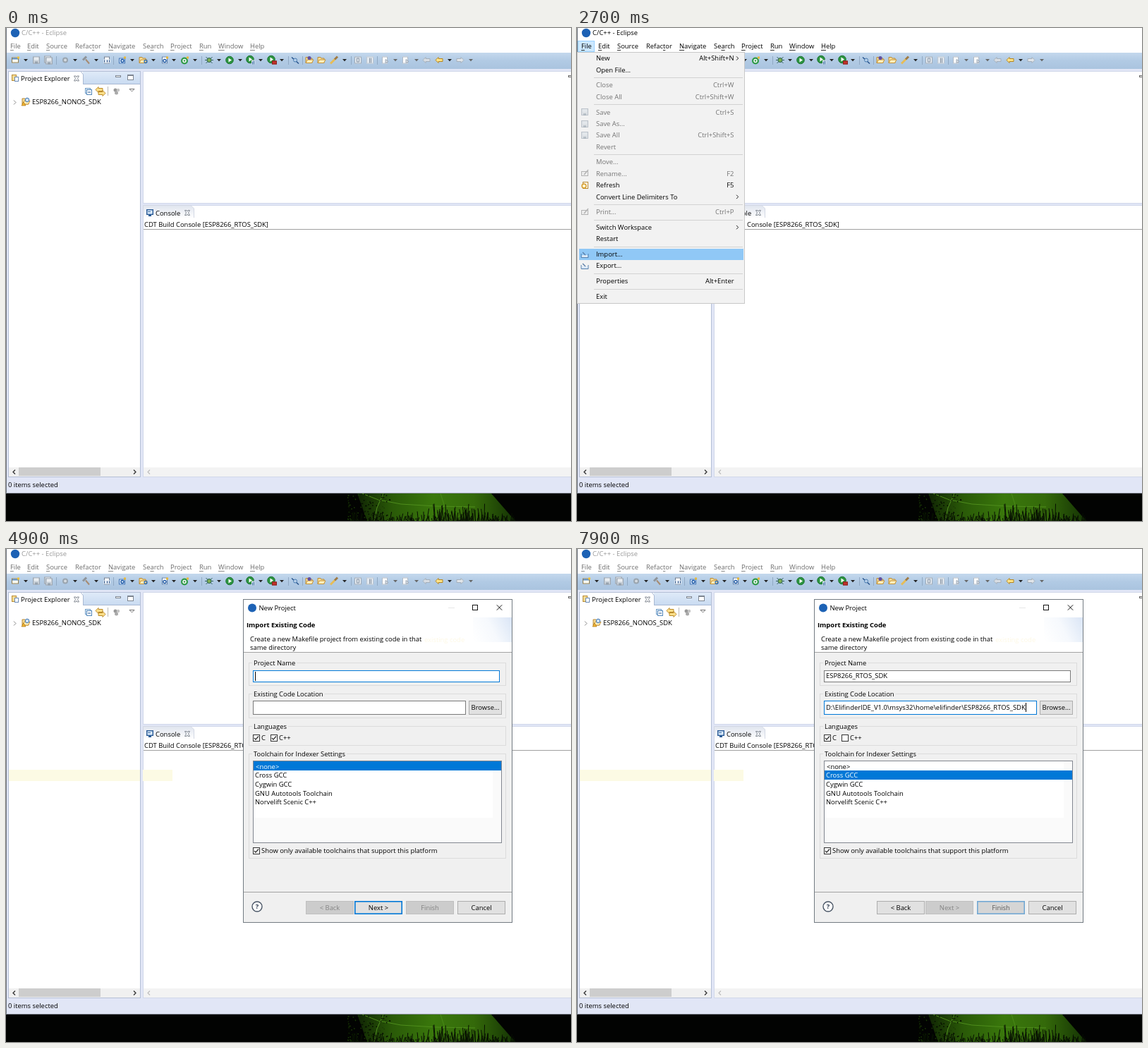
Animation of 801 by 699 pixels, one loop 8000 ms. Source, as an HTML page with a canvas:

```html
<!DOCTYPE html>
<html lang="en">
<head>
<meta charset="utf-8">
<title>Import project</title>
<style>
html, body { margin: 0; width: 100%; height: 100%; overflow: hidden; background: #000; }
canvas { display: block; width: 801px; height: 699px; }
</style>
</head>
<body>
<canvas id="stage" width="801" height="699"></canvas>
<script>
const ctx = document.getElementById('stage').getContext('2d');
const LOOP = 8000, BLUE = '#0078d7', LOGO = '#1d62b5', FACE = '#f0f0f0';
const FONT = '9.42px "Open Sans", "Noto Sans", sans-serif';
const LOCATION = 'D:\\ElifinderIDE_V1.0\\msys32\\home\\elifinder\\ESP8266_RTOS_SDK';

// Drawing helpers
function rect(x, y, w, h, fill) {
  ctx.fillStyle = fill;
  ctx.fillRect(x, y, w, h);
}
function box(x, y, w, h, fill, line, lw = 1) {
  if (fill) rect(x, y, w, h, fill);
  ctx.strokeStyle = line;
  ctx.lineWidth = lw;
  ctx.strokeRect(x + lw / 2, y + lw / 2, w - lw, h - lw);
}
function path(pts, line, lw = 1, fill) {
  ctx.beginPath();
  for (let i = 0; i < pts.length; i += 2) ctx.lineTo(pts[i], pts[i + 1]);
  if (fill) { ctx.closePath(); ctx.fillStyle = fill; ctx.fill(); }
  if (line) { ctx.strokeStyle = line; ctx.lineWidth = lw; ctx.stroke(); }
}
function disc(x, y, r, fill, line, lw = 1) {
  ctx.beginPath();
  ctx.arc(x, y, r, 0, 7);
  if (fill) { ctx.fillStyle = fill; ctx.fill(); }
  if (line) { ctx.strokeStyle = line; ctx.lineWidth = lw; ctx.stroke(); }
}
// y is the vertical middle of the capitals
function text(s, x, y, color = '#000', align = 'left', weight = '') {
  ctx.font = `${weight} ${FONT}`;
  ctx.textAlign = align;
  ctx.fillStyle = color;
  ctx.fillText(s, x, Math.round(y + 3.4));
}
function widthOf(s) {
  ctx.font = FONT;
  return ctx.measureText(s).width;
}
function shade(x0, y0, x1, y1, ...colors) {
  const g = ctx.createLinearGradient(x0, y0, x1, y1);
  colors.forEach((c, i) => g.addColorStop(i / (colors.length - 1), c));
  return g;
}
function faded(alpha, draw) {
  ctx.save();
  ctx.globalAlpha *= alpha;
  draw();
  ctx.restore();
}
const clamp = k => Math.max(0, Math.min(1, k));
const down = (x, y, color = '#222') => path([x - 3, y - 1.5, x + 3, y - 1.5, x, y + 1.8], null, 1, color);
const cross = (x, y, r, color, lw = 1) => {
  path([x - r, y - r, x + r, y + r], color, lw);
  path([x - r, y + r, x + r, y - r], color, lw);
};
const folder = (x, y) => {
  path([x - 5, y + 4, x - 5, y - 4, x - 1, y - 4, x, y - 2.5, x + 4, y - 2.5, x + 4, y + 4], '#b98a35', 1, '#f7dc96');
  path([x - 5, y + 4, x - 2.5, y - .5, x + 6, y - .5, x + 3.5, y + 4], '#c79436', 1, '#fff0bd');
};
const floppy = (x, y) => {
  box(x - 5, y - 5, 10, 10, '#c9d1d9', '#9ca6b1');
  rect(x - 3, y - 4, 6, 4, '#e9edf1');
  rect(x - 2, y + 2, 4, 3, '#98a3ae');
};
const page = (x, y, line = '#8b99aa') => box(x - 4, y - 5, 8, 10, '#fff', line);
const codeFile = (x, y) => {
  box(x - 5, y - 4.5, 11, 9, '#fff', '#4a78ad');
  rect(x - 5, y - 4.5, 11, 2, '#6d9bd0');
  rect(x - 3, y, 3, 2, '#396ca8');
  rect(x + 1, y, 3, 1, '#396ca8');
};

// Toolbar icons
const icons = {
  fresh(x, y) { box(x - 5, y - 4, 10, 8, '#fffdf0', '#8a7a50'); rect(x - 4, y - 3, 8, 2, '#5b8ec6'); rect(x + 3, y - 5, 3, 3, '#edc13c'); },
  save: floppy,
  saveAll(x, y) { floppy(x - 1, y - 1); floppy(x + 1, y + 1); },
  gear(x, y) { disc(x, y, 3, '#d5dbe1', '#9aa5af', 2); },
  hammer(x, y) { path([x - 1, y - 1, x + 4, y + 5], '#a88c72', 2); path([x - 5, y, x, y - 5], '#8f9499', 3); },
  binary(x, y) { page(x, y, '#6b7b90'); rect(x - 5, y - 1, 10, 5, '#e3ebf5'); [-4, 0, 3].forEach(d => rect(x + d, y, 1, 3, '#234a80')); },
  cproj(x, y) { box(x - 5, y - 3, 9, 8, '#dbe9fa', '#3f73b5'); disc(x, y + 1, 2, null, '#1f5aa6', 1.4); rect(x + 2, y - 5, 3, 3, '#e8b93a'); },
  src(x, y) { folder(x - 1, y); disc(x + 3, y + 2, 2, null, '#2e6cb0', 1.3); },
  cfile(x, y) { page(x, y, '#5b7fab'); disc(x, y + 1, 2, null, '#1f5aa6', 1.4); rect(x + 2, y - 5, 3, 3, '#e8b93a'); },
  klass(x, y) { disc(x - 1, y + 1, 5, '#2f9a48'); disc(x - 1, y + 1, 2, null, '#fff', 1.4); rect(x + 2, y - 5, 3, 3, '#e8b93a'); },
  bug(x, y) { cross(x, y, 4.5, '#33635f'); path([x - 6, y, x + 6, y], '#33635f'); disc(x, y, 3, '#7fae54', '#28614f'); },
  run(x, y) { disc(x, y, 5.3, '#2c9440', '#1d7432'); path([x - 1.5, y - 3, x + 3, y, x - 1.5, y + 3], null, 1, '#fff'); },
  profile(x, y) { icons.run(x - 1, y - 1); rect(x + 1, y, 5, 6, '#dbe3ec'); rect(x + 2, y + 2, 1, 4, '#2c66a2'); rect(x + 4, y + 1, 1, 5, '#2c66a2'); },
  tools(x, y) { icons.run(x - 1, y - 1); box(x, y + 1, 7, 5, '#c6322b', '#86211c'); },
  skip(x, y) { path([x - 5, y - 4, x + 5, y + 5], '#26528c', 1.5); disc(x, y, 2.5, '#b7cfe9', '#467aaf'); },
  ball(x, y) { folder(x, y); disc(x, y - 3, 2.6, '#6250a0'); },
  folder,
  pen(x, y) { path([x - 5, y + 5, x + 1, y - 1], '#e6bd58', 3); path([x + 1, y - 1, x + 5, y - 5], '#a07b45', 3); },
  block(x, y) { box(x - 5, y - 5, 10, 10, '#e4eaf1', '#9fabb8'); box(x - 2, y - 3, 4, 6, null, '#8592a1'); },
  mark(x, y) { box(x - 5, y - 5, 10, 10, '#e4eaf1', '#c0c9d3'); rect(x - 1, y - 3, 1, 7, '#7f8c9b'); rect(x + 1, y - 3, 1, 7, '#7f8c9b'); },
  step(x, y) { page(x - 1, y, '#b0bac6'); path([x, y - 1, x + 4, y + 2, x, y + 4], '#9aa6b3', 1, '#dfe5ec'); },
  last(x, y) { arrow(x, y, -1, '#d9dee4', '#a4afba'); },
  back(x, y) { arrow(x, y, -1, '#ffe48a', '#b5851d'); },
  next(x, y) { arrow(x, y, 1, '#e2e6ea', '#a4afba'); }
};
function arrow(x, y, d, fill, line) {
  path([x + d * 5, y, x + d, y - 4, x + d, y - 2, x - d * 5, y - 2, x - d * 5, y + 2, x + d, y + 2, x + d, y + 4, x + d * 5, y], line, 1, fill);
}
const tools = [[13, 'fresh'], [43, 'save'], [60, 'saveAll'], [84, 'gear'], [114, 'hammer'], [143, 'binary'], [165, 'cproj'],
  [195, 'src'], [225, 'cfile'], [254, 'klass'], [288, 'bug'], [317, 'run'], [347, 'profile'], [377, 'tools'], [410, 'skip'],
  [430, 'ball'], [447, 'folder'], [465, 'pen'], [499, 'block'], [516, 'mark'], [538, 'step'], [567, 'step'], [596, 'last'],
  [614, 'back'], [644, 'next']];
const drops = [28, 98, 128, 179, 209, 238, 268, 302, 332, 361, 391, 480, 552, 582, 629, 659];

// Label, left edge, index of the underlined letter
const menuBar = [['File', 6, 0], ['Edit', 30, 0], ['Source', 57, 0], ['Refactor', 98, 5], ['Navigate', 145, 0],
  ['Search', 194, 2], ['Project', 233, 0], ['Run', 274, 0], ['Window', 301, 0], ['Help', 346, 0]];

// "-" is a separator, "~" marks a disabled entry, ">" a submenu
const fileMenu = ['New|Alt+Shift+N|>', 'Open File...', '-', '~Close|Ctrl+W', '~Close All|Ctrl+Shift+W', '-', '~Save|Ctrl+S',
  '~Save As...', '~Save All|Ctrl+Shift+S', '~Revert', '-', '~Move...', '~Rename...|F2', 'Refresh|F5',
  'Convert Line Delimiters To||>', '-', '~Print...|Ctrl+P', '-', 'Switch Workspace||>', 'Restart', '-', 'Import...',
  'Export...', '-', 'Properties|Alt+Enter', '-', 'Exit'];

function desktop() {
  rect(0, 660, 801, 39, '#020302');
  path([498, 660, 688, 660, 722, 699, 512, 699], null, 1, shade(490, 0, 722, 0, '#0c1c03', '#2a5a08', '#3a780c', '#34690a', '#143204'));
  path([505, 660, 528, 669, 560, 675, 610, 678, 665, 679], '#4f8d1c', 1);
  path([535, 660, 526, 680, 522, 699], '#528f20', 1);
  path([616, 660, 622, 679], '#4a8a18', 1);
  let seed = 7;
  const rnd = () => (seed = seed * 16807 % 2147483647) / 2147483647;
  for (let i = 0; i < 420; i++) {
    const x = 488 + rnd() * 235, h = rnd();
    if (i < 160) rect(484 + h * h * 60, 660 + rnd() * 39, 1.5, 1.5, i % 3 ? '#050a02' : '#1c3d06');
    else {
      const tall = x > 595 && x < 680 ? 24 : 13;
      path([x, 699, x + rnd() * 6 - 3, 698 - h * h * tall], '#071002', 1);
    }
  }
}

function tabClose(x, y) {
  path([x - 3.5, y - 3.5, x - 1, y - 3.5, x, y - 2, x + 1, y - 3.5, x + 3.5, y - 3.5, x + 1.5, y, x + 3.5, y + 3.5,
    x + 1, y + 3.5, x, y + 2, x - 1, y + 3.5, x - 3.5, y + 3.5, x - 1.5, y, x - 3.5, y - 3.5], '#7b828c', .9);
}

function workbench(active) {
  rect(0, 0, 801, 660, '#e1e6f6');
  rect(0, 0, 801, 35, '#fff');
  disc(13, 7, 6.2, LOGO);
  text('C/C++ - Eclipse', 22, 7, active ? '#000' : '#999');
  if (active) box(1, 18, 24, 16, '#cce8ff', '#99d1ff');
  const ink = active ? '#000' : '#6d6d6d';
  for (const [s, x, u] of menuBar) {
    text(s, x, 26, ink);
    const start = widthOf(s.slice(0, u));
    rect(x + start, 31, widthOf(s[u]), .8, ink);
  }
  rect(0, 35, 801, 23, shade(0, 35, 0, 58, '#c4d8ed', '#b1cae4', '#aac4df'));
  for (const [x, name] of tools) icons[name](x, 45.5);
  for (const x of drops) down(x, 45.5, x > 540 && x < 600 || x > 650 ? '#666' : '#222');
  [71, 152, 277, 400, 420, 489, 526].forEach(x => rect(x, 40, 1, 12, '#91a9c3'));

  // Project Explorer
  box(3, 61, 188, 576, '#fff', '#b4bfd6');
  rect(109, 62, 81, 17, shade(0, 62, 0, 79, '#dfeaf8', '#c9dbf1'));
  path([109.5, 79, 109.5, 66, 106, 61.5], '#a9b9d3');
  path([109, 79.5, 190, 79.5], '#a9b9d3');
  box(8, 66, 7, 9, '#f8db92', '#b78d38');
  box(12, 69, 6, 7, '#fff', '#6c8db8');
  text('Project Explorer', 21, 71.5);
  tabClose(100, 71.5);
  box(155, 67, 8, 3, '#fff', '#7d8590');
  box(172, 66, 9, 8, '#fff', '#7d8590');
  rect(172, 66, 9, 2, '#7d8590');
  box(112, 85, 8, 8, '#eaf3fc', '#6c9bc7');
  box(114, 87, 8, 8, '#fff', '#5387ba');
  rect(116, 90.5, 4, 1, '#26598f');
  arrow(132, 87.5, -1, '#ffe08a', '#b98a2b');
  arrow(136, 92.5, 1, '#ffe08a', '#b98a2b');
  rect(144, 83, 1, 13, '#b8b8b8');
  disc(155, 88, 2.5, '#999');
  disc(159, 88, 2.2, '#c5c5c5');
  disc(156.5, 92, 2.5, '#aaa');
  path([175, 86.5, 182, 86.5, 178.5, 90, 175, 86.5], '#666', .9, '#fff');
  path([11, 102.5, 14, 105.5, 11, 108.5], '#888');
  folder(28, 104);
  disc(30, 102, 2.8, '#cfe2f7', '#3c73ae');
  path([22, 110, 25, 105, 28, 110], '#a87518', .7, '#f3b52f');
  text('ESP8266_NONOS_SDK', 37, 105);
  rect(4, 623, 186, 13, FACE);
  rect(18, 623, 116, 12, '#cdcdcd');
  path([13, 626.5, 10, 629.5, 13, 632.5], '#333', 1.3);
  path([181, 626.5, 184, 629.5, 181, 632.5], '#333', 1.3);

  // Editor area and console
  box(194, 61, 620, 188, '#fff', '#d1d8ea');
  box(797, 67, 8, 3, '#fff', '#666');
  box(194, 251, 620, 386, '#fff', '#d1d8ea');
  path([194.5, 270, 194.5, 251.5, 262, 251.5, 266.5, 256, 266.5, 270], '#d3d8e4', 1, shade(0, 251, 0, 270, '#dfe4ee', '#fff'));
  rect(195, 269, 606, 3, '#fff');
  box(199, 257, 10, 8, '#dcecff', '#2c5c96', 1.4);
  rect(202, 265, 4, 2, '#2c5c96');
  rect(201, 260, 4, 1, '#416f9f');
  text('Console', 212, 262.5);
  tabClose(257, 262);
  text('CDT Build Console [ESP8266_RTOS_SDK]', 196, 279);
  rect(195, 285, 606, 1, '#a0a0a0');
  rect(195, 623, 606, 13, '#f3f3f3');
  path([204, 626.5, 201, 629.5, 204, 632.5], '#bbb', 1.1);
  text('0 items selected', 3, 648);
  rect(0, 0, 1, 660, '#6f7680');
  rect(0, 659, 801, 1, '#8d939f');
}

function menuIcon(label, y) {
  if (/^Save/.test(label)) faded(.5, () => floppy(11, y));
  if (/Rename|Print/.test(label)) {
    box(6, y - 3, 10, 7, '#eee', '#b2b2b2');
    path([10, y + 2, 16, y - 5], '#b2b2b2', 1.4);
  }
  if (label === 'Refresh') {
    page(12, y, '#b98a35');
    disc(10, y + 1, 3, '#fff3cf', '#d49a28', 1.4);
  }
  if (/port/.test(label)) {
    path([6, y - 1, 6, y + 4.5, 16, y + 4.5, 16, y - 1], '#5580ad');
    rect(7, y + 1, 8, 3, '#dbe8f6');
    path([8, y - 3, 12, y + 1], '#587ca6', 1.2);
  }
}

function dropMenu(hot) {
  box(0, 34, 238, 357, '#f2f2f2', '#c8c8c8');
  let y = 43;
  for (const item of fileMenu) {
    if (item === '-') {
      rect(24, Math.round(y - 5.5), 211, 1, '#d2d2d2');
      y += 5.15;
      continue;
    }
    const off = item[0] === '~', [label, key, sub] = item.replace('~', '').split('|');
    const ink = off ? '#757575' : '#000';
    if (label.startsWith(hot)) rect(3, Math.round(y - 8), 233, 16, '#90c8f6');
    menuIcon(label, Math.round(y));
    text(label, 27, y, ink);
    if (key) text(key, 222.5, y, ink, 'right');
    if (sub) path([226, y - 2.7, 228.7, y, 226, y + 2.7], '#222');
    y += 16.45;
  }
}

// States: 0 disabled, 1 normal, 2 default
function button(label, x, y, w, h, state) {
  const line = ['#bfbfbf', '#adadad', BLUE][state];
  box(x, y, w, h, state ? '#e1e1e1' : '#ccc', line, state === 2 ? 1.6 : 1);
  text(label, x + w / 2, y + h / 2, state ? '#000' : '#838383', 'center');
}
function blendButton(label, x, y, from, to, k) {
  button(label, x, y, 68, 19, from);
  if (k > 0) faded(k, () => button(label, x, y, 68, 19, to));
}

function dialogFrame(title, heading, lines, bottom) {
  box(336, 71, 382, bottom - 71, FACE, '#737b82');
  rect(337, 72, 380, 75, '#fff');
  disc(349, 83.5, 6, LOGO);
  text(title, 358.5, 83.5);
  rect(627, 83, 9, 1, '#e6e6e6');
  box(661, 79, 8, 8, null, '#111');
  cross(699.5, 83, 3.7, '#111');
  text(heading, 341, 108, '#000', 'left', 'bold');
  lines.forEach((s, i) => text(s, 346, 127.5 + i * 12.5));
  rect(337, 146, 380, 1, '#a3a3a3');
  rect(337, bottom - 44, 380, 1, '#a3a3a3');
  disc(356, bottom - 23, 7, '#fff', '#4a5666', 1.4);
  text('?', 356, bottom - 23, '#2f3d50', 'center', 'bold');
}

function importDialog(t) {
  dialogFrame('Import', 'Select', ['Creates a new Makefile project in a directory containing existing code'], 477);
  ctx.beginPath();
  ctx.moveTo(664, 146);
  ctx.quadraticCurveTo(672, 102, 717, 97);
  ctx.lineTo(717, 146);
  ctx.fillStyle = shade(664, 146, 716, 100, '#f3f7fd', '#cddcf3');
  ctx.fill();
  path([672, 121, 667, 121, 667, 134, 700, 134, 700, 121, 695, 121], '#5877a4', 4);
  path([672, 121, 667, 121, 667, 134, 700, 134, 700, 121, 695, 121], '#e8effa', 1.5);
  path([676, 109, 688, 122], '#56749f', 2.4);
  path([689, 117, 690, 125, 682, 124], '#56749f', 1, '#56749f');

  text('Select an import source:', 348, 165.5);
  box(348, 176, 357, 15, '#fff', '#8d949b');
  const chosen = t < 4600;
  if (chosen) rect(349, 177, 62, 13, BLUE);
  text('type filter text', 350, 183.5, chosen ? '#fff' : '#000');
  if (t >= 3600 && t < 4100) rect(410, 177, 1, 13, '#000');

  box(348, 195, 357, 188, '#fff', '#828790');
  rect(349, 248.5, 342, 1, '#fdfae6');
  rect(692, 196, 12, 186, FACE);
  rect(692, 241, 11, 128, '#cdcdcd');
  path([695, 205, 697.7, 202, 700.4, 205], '#444', 1.2);
  path([695, 374, 697.7, 377, 700.4, 374], '#444', 1.2);
  const hover = t === 3600 ? .5 : t > 3600 && t < 3900 ? 1 : 0;
  faded(hover, () => rect(380, 211, 167, 15, '#e0f0fd'));
  rect(380, 226, 163, 15, '#d9d9d9');
  ['C/C++ Project Settings', 'Existing code as Autotools project', 'Existing Code as Makefile Project', 'Git', 'Install',
    'Oomph', 'Remote Systems', 'RPM', 'Run/Debug', 'Tasks', 'Team', 'Tracing'].forEach((s, i) => {
    const y = 203.5 + i * 14.95;
    if (i > 2) {
      path([356, y - 2.7, 358.8, y + .3, 356, y + 3.3], '#999');
      folder(371.5, y + .5);
    } else if (i) codeFile(385.5, y);
    else { page(386, y); disc(388, y - 1, 2.7, '#cfe2f7', '#3c73ae', 1.4); path([381, y + 4, 388, y - 2], '#426e9c', 1.6); }
    text(s, i > 2 ? 381.5 : 395.5, y);
  });
  button('< Back', 425, 446, 68, 19, 0);
  button('Next >', 494, 446, 68, 19, 2);
  button('Finish', 567, 446, 68, 19, 0);
  button('Cancel', 640, 446, 68, 19, 1);
}

function group(label, y, h) {
  box(344, y, 365, h, null, '#dcdcdc');
  rect(349, y - 2, widthOf(label) + 4, 5, FACE);
  text(label, 351, y + .5);
}
function check(label, x, y, on, line = '#333') {
  box(x, y, 10, 10, '#fff', line);
  if (on) path([x + 2, y + 5, x + 4, y + 7.2, x + 8, y + 2.5], '#222', 1.2);
  text(label, x + 12, y + 5);
}
function field(y, w, h, focus, value) {
  box(350, y, w, h, '#fff', '#7a7a7a');
  if (focus > 0) faded(focus, () => box(350, y, w, h, null, BLUE));
  text(value, 353, y + h / 2 - .5);
}

function projectDialog(t) {
  dialogFrame('New Project', 'Import Existing Code',
    ['Create a new Makefile project from existing code in that', 'same directory'], 530);
  rect(662, 97, 55, 35, shade(662, 128, 717, 100, '#fff', '#f6f9fd', '#dbe6f6'));
  text('existing code', 593, 128.5, '#fdf8e4');

  const filled = t >= 7800;
  group('Project Name', 161, 33);
  field(172, 350, 17, clamp((6200 - t) / 200), filled ? 'ESP8266_RTOS_SDK' : '');
  if (t >= 4900 && t < 5500) rect(353, 174, 1, 13, '#000');

  group('Existing Code Location', 205, 35);
  field(215, 302, 20, clamp((t - 6900) / 300), filled ? LOCATION : '');
  if (filled) rect(353 + Math.round(widthOf(LOCATION)), 218, 1, 13, '#000');
  else if (t >= 7000 && t < 7600) rect(353, 218, 1, 13, '#000');
  button('Browse...', 656, 215, 47, 20, 1);

  group('Languages', 251, 28);
  check('C', 350, 263, true);
  check('C++', 375, 263, t < 6600, t >= 6500 && t < 6900 ? BLUE : '#333');

  group('Toolchain for Indexer Settings', 290, 149);
  box(350, 300, 353, 117, '#fafafa', '#828790');
  rect(351, 301, 339, 80, '#fff');
  const pick = t < 6000 ? 0 : 1;
  ['<none>', 'Cross GCC', 'Cygwin GCC', 'GNU Autotools Toolchain', 'Norvelift Scenic C++'].forEach((s, i) => {
    const y = 308.3 + i * 12.65;
    if (i === pick) rect(351, Math.floor(y - 6.6), 351, 13, BLUE);
    text(s, i ? 353 : 354, y, i === pick ? '#fff' : '#000');
  });
  check('Show only available toolchains that support this platform', 350, 423, true);

  const k = clamp((t - 4900) / 300);
  blendButton('< Back', 425, 499, 0, 1, k);
  blendButton('Next >', 494, 499, 2, 0, k);
  blendButton('Finish', 567, 499, 0, 2, t >= 7900 ? .45 : 0);
  button('Cancel', 640, 499, 68, 19, 1);
}

// Colour left in the place of the chosen menu entry
function afterglow(t) {
  const k = clamp((3400 - t) / 400) ** 1.6;
  const bar = fill => { rect(4, 313, 186, 16, fill); rect(194, 313, 42, 16, fill); };
  if (k <= 0) return bar('#fcfae4');
  faded(k, () => {
    bar('#90c8f6');
    text('Import...', 27, 320.65);
  });
}

function hotEntry(t) {
  if (t < 1900) return '?';
  if (t >= 2700) return 'Import';
  return ['New', 'New', 'Save As', 'Refresh', 'Switch', 'Restart'][Math.floor((t - 1900) / 100)] || '?';
}

function draw(t) {
  desktop();
  workbench(t >= 1700 && t < 3000);
  if (t >= 1800 && t < 3000) faded(t === 1800 ? .6 : 1, () => dropMenu(hotEntry(t)));
  if (t >= 3000) afterglow(t);
  if (t >= 4800) projectDialog(t);
  else if (t >= 3100) {
    const left = clamp((3400 - t) / 300);
    const s = 1 - .03 * left * left;
    ctx.save();
    ctx.translate(526.5, 274);
    ctx.scale(s, s);
    ctx.translate(-526.5, -274);
    faded(1 - .5 * left ** 2.2, () => importDialog(t));
    ctx.restore();
  }
}

function tick(now) {
  draw(Math.floor(now % LOOP / 100) * 100);
  requestAnimationFrame(tick);
}
draw(0);
requestAnimationFrame(tick);
</script>
</body>
</html>
```
